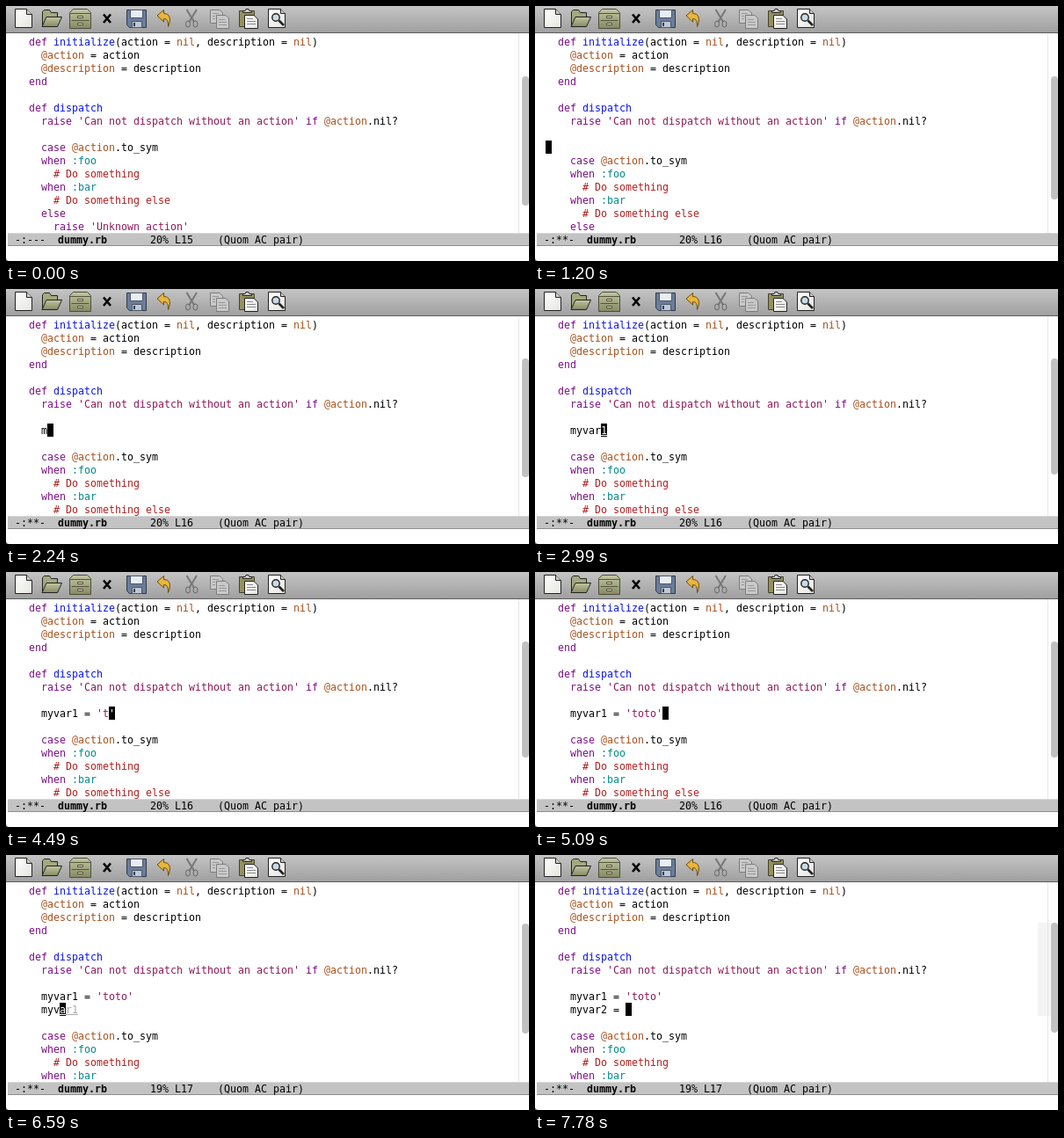
An HTML page that plays this animation: 595x290 px, repeating every 8000 ms.

```html
<!DOCTYPE html>
<html lang="en">
<head>
<meta charset="utf-8">
<title>Editor typing</title>
<style>
html, body { margin: 0; width: 100%; height: 100%; overflow: hidden; background: #fff; }
svg { display: block; }
text { font: 11.63px "DejaVu Sans Mono", "Liberation Mono", monospace; white-space: pre; fill: #000; }
.comment { fill: #b51f1f; }
.string { fill: #8e1a58; }
.variable { fill: #a8521f; }
.symbol { fill: #008b8b; }
.name { fill: #0a14f0; }
.keyword { fill: #7d0f86; }
.ghost { fill: #a9a9a9; }
.bold { font-weight: bold; }
#caretChar { fill: #fff; }
</style>
</head>
<body>
<svg width="595" height="290" viewBox="0 0 595 290">
  <defs>
    <linearGradient id="bar" x2="0" y2="1">
      <stop offset="0" stop-color="#c4c4c4"/><stop offset="1" stop-color="#a0a0a0"/>
    </linearGradient>
    <linearGradient id="olive" x2="0" y2="1">
      <stop offset="0" stop-color="#c3c5a2"/><stop offset="1" stop-color="#868a63"/>
    </linearGradient>
    <linearGradient id="paper" x2="1" y2="1">
      <stop offset="0" stop-color="#fff"/><stop offset="1" stop-color="#e4e4df"/>
    </linearGradient>
  </defs>
  <rect width="595" height="290" fill="#fff"/>

  <!-- toolbar -->
  <rect width="595" height="30" fill="url(#bar)"/>
  <rect y="30" width="595" height="1" fill="#5c5c5c"/>
  <g stroke="#222" stroke-linejoin="round">
    <path d="M10.500 3.500H23.500L29.500 9.500V24.500H10.500Z" fill="url(#paper)"/>
    <path d="M23.500 3.500V9.500H29.500" fill="#cfcfca"/>

    <path d="M41.500 22.500V6.500L43.500 4.500H49.500L51.500 7.500H58.500V12" fill="#a4a87f"/>
    <path d="M41 23.500L46 12.500H63.500L58.500 23.500Z" fill="url(#olive)"/>

    <path d="M72.500 7.500L76.500 3.500H92.500L96.500 7.500V25.500H72.500Z" fill="url(#olive)" stroke="#4c4e38"/>
    <path d="M72.500 8.500H96.500M74.500 16.500H94.500" fill="none" stroke="#55573e"/>
    <path d="M81.500 11.500H87.500V13.500H81.500ZM81.500 19.500H87.500V21.500H81.500Z" fill="#e6e7d2" stroke="#4c4e38"/>

    <path d="M111 9.500L119 19M119 9.500L111 19" fill="none" stroke="#000" stroke-width="2.600"/>

    <path d="M137.500 4.500H159.500V24.500H140.500L137.500 21.500Z" fill="#6b7d98" stroke="#2e3a4c"/>
    <path d="M141.500 4.500H155.500V13.500H141.500Z" fill="#e9edf2" stroke="#47566c"/>
    <path d="M143.500 17.500H154.500V24.500H143.500Z" fill="#c1c8d2" stroke="#47566c"/>
    <path d="M146 19V23" stroke="#333f52" stroke-width="2"/>

    <path d="M172 11L179.500 4.500V8.500C186 8.500 188.500 14 184.500 23.500C184.500 17 183.500 14.500 179.500 14.500V18Z" fill="#e8b63c" stroke="#6c4c0c"/>

    <g fill="none" stroke="#666">
      <path d="M205.500 4L214 18M217 4L208.500 18" stroke="#777" stroke-width="2"/>
      <ellipse cx="207" cy="20.500" rx="2.500" ry="3.500"/>
      <ellipse cx="215.500" cy="20.500" rx="2.500" ry="3.500"/>
    </g>

    <g fill="#c9c9c9" stroke="#7c7c7c">
      <path d="M232.500 4.500H243L246.500 8V19.500H232.500Z"/>
      <path d="M239.500 10.500H250L253.500 14V25.500H239.500Z"/>
      <path d="M235 8.500H242M235 11.500H238M235 14.500H238M242 15.500H249M242 18.500H251M242 21.500H251" stroke="#979797"/>
    </g>

    <path d="M265.500 5.500H282.500V23.500H265.500Z" fill="#96905f" stroke="#45422a"/>
    <path d="M269.500 7.500V5.500H272L273 3.500H276L277 5.500H279.500V7.500Z" fill="#ccc"/>
    <path d="M271.500 10.500H282L286.500 15V25.500H271.500Z" fill="url(#paper)"/>
    <path d="M274 14.500H281M274 17.500H284M274 20.500H284" stroke="#888"/>

    <path d="M298.500 3.500H312.500L317.500 8.500V24.500H298.500Z" fill="url(#paper)"/>
    <path d="M312.500 3.500V8.500H317.500" fill="#ccc"/>
    <circle cx="307" cy="13" r="4.200" fill="#c7dbe6" stroke-width="1.400"/>
    <path d="M310.500 16.500L316 22" stroke-width="2.600"/>
  </g>

  <!-- scroll bar -->
  <rect id="band" x="572" y="77" width="14" height="106" fill="#f4f4f4"/>
  <rect x="583" y="31" width="1" height="227" fill="#e6e6e6"/>
  <rect id="thumb" x="587" width="8" rx="4" fill="#c1c1c1"/>

  <g id="code"></g>
  <g id="caret">
    <rect width="7" height="15"/>
    <text id="caretChar" y="12"></text>
    <rect id="caretLine" y="13" width="7" height="1" fill="#fff"/>
  </g>

  <!-- mode line -->
  <rect x="2" y="258" width="593" height="15" fill="#c3c3c3"/>
  <path d="M2 258.500H595" stroke="#d8d8d8"/>
  <path d="M2 272.500H595" stroke="#8e8e8e"/>
  <text id="flags" x="10" y="270"></text>
  <text class="bold" x="59" y="270">dummy.rb</text>
  <text id="place" x="164" y="270"></text>
  <text x="241" y="270">(Quom AC pair)</text>
  <path d="M0 286Q0 290 4 290H0Z" fill="#555"/>
</svg>
<script>
const LOOP = 8000, LEFT = 12, TOP = 33, CHAR = 7, LINE = 15, ROWS = 15;
const $ = id => document.getElementById(id);

const head = `  def initialize(action = nil, description = nil)
    @action = action
    @description = description
  end

  def dispatch
    raise 'Can not dispatch without an action' if @action.nil?`.split('\n');

const tail = `    case @action.to_sym
    when :foo
      # Do something
    when :bar
      # Do something else
    else
      raise 'Unknown action'`.split('\n');

// Edited lines: "|" marks the caret, "~" a caret followed by a suggested ending.
const first = s => '\n    ' + s + '\n';
const second = s => first("myvar1 = 'toto'") + '    ' + s + '\n';
const steps = [
  [0, '', { flags: '-:---', place: '20% L15', top: 80, end: 227, skip: 0, band: false }],
  [150, '|'],
  [750, ''],
  [1200, '\n|', { flags: '-:**-', place: '20% L16', end: 220 }],
  [1500, ['', '', tail[0], tail[1]].join('\n'), { end: 214, skip: 1 }],
  [1640, '\n\n|', { place: '20% L17', skip: 0 }],
  [1790, '\n|\n', { place: '20% L16' }],
  [2090, first('|'), { top: 79 }],
  [2240, first('m|')],
  [2540, first('my|'), { end: 211 }],
  [2690, first('myv|')],
  [2840, first('myva|')],
  [2990, first('myvar~1')],
  [3290, first('myvar1|')],
  [3590, first('myvar1 |')],
  [3890, first('myvar1 = |')],
  [4190, first("myvar1 = '|'")],
  [4490, first("myvar1 = 't|'")],
  [4640, first("myvar1 = 'to|'")],
  [4790, first("myvar1 = 'toto|'")],
  [5090, first("myvar1 = 'toto'|")],
  [5390, second('|'), { place: '19% L17', top: 78, end: 203 }],
  [5990, second('m|')],
  [6290, second('my|')],
  [6440, second('my~var1')],
  [6590, second('myv~ar1')],
  [6740, second('myva~r1')],
  [6890, second('myvar~1')],
  [7190, second('myvar2|')],
  [7630, second('myvar2 |'), { top: 77, end: 202 }],
  [7780, second('myvar2 = |'), { band: true }]
];

const token = /(?<comment>#.*)|(?<string>'[^']*'?)|(?<variable>@\w+|(?<!\.)\bnil\b)|(?<symbol>:\w+)|(?<name>(?<=def )\w+)|(?<keyword>\b(?:def|end|raise|if|case|when|else)\b)/g;

function paint(line) {
  return line.replace(token, (match, ...rest) => {
    const groups = rest[rest.length - 1];
    const kind = Object.keys(groups).find(k => groups[k] !== undefined);
    return `<tspan class="${kind}">${match}</tspan>`;
  });
}

function drawLine(raw, row) {
  const [typed, ghost = ''] = raw.replace('|', '').split('~');
  const y = TOP + row * LINE;
  let out = `<text x="${LEFT}" y="${y + 12}">${paint(typed)}<tspan class="ghost">${ghost}</tspan></text>`;
  if (ghost) {
    out += `<rect class="ghost" x="${LEFT + typed.length * CHAR}" y="${y + 13}" width="${ghost.length * CHAR}" height="1"/>`;
  }
  return out;
}

let state = {};
const scenes = steps.map(([time, text, change]) => {
  state = { ...state, ...change };
  const rows = [...head, ...text.split('\n'), ...tail.slice(state.skip)].slice(0, ROWS);
  const row = rows.findIndex(r => /[|~]/.test(r));
  const col = row < 0 ? 0 : rows[row].search(/[|~]/);
  return {
    ...state, time, row, col,
    char: row < 0 ? '' : rows[row][col + 1] || '',
    ghost: row >= 0 && rows[row][col] === '~',
    code: rows.map(drawLine).join('')
  };
});

function show(s) {
  $('code').innerHTML = s.code;
  $('caret').style.display = s.row < 0 ? 'none' : '';
  $('caret').setAttribute('transform', `translate(${LEFT + s.col * CHAR} ${TOP + s.row * LINE})`);
  $('caretChar').textContent = s.char;
  $('caretLine').style.display = s.ghost ? '' : 'none';
  $('flags').textContent = s.flags;
  $('place').textContent = s.place;
  $('thumb').setAttribute('y', s.top);
  $('thumb').setAttribute('height', s.end - s.top);
  $('band').style.display = s.band ? '' : 'none';
}

let shown;
function tick() {
  const t = performance.now() % LOOP;
  const scene = scenes.filter(s => s.time <= t).pop();
  if (scene !== shown) show(shown = scene);
  requestAnimationFrame(tick);
}
tick();
</script>
</body>
</html>
```
